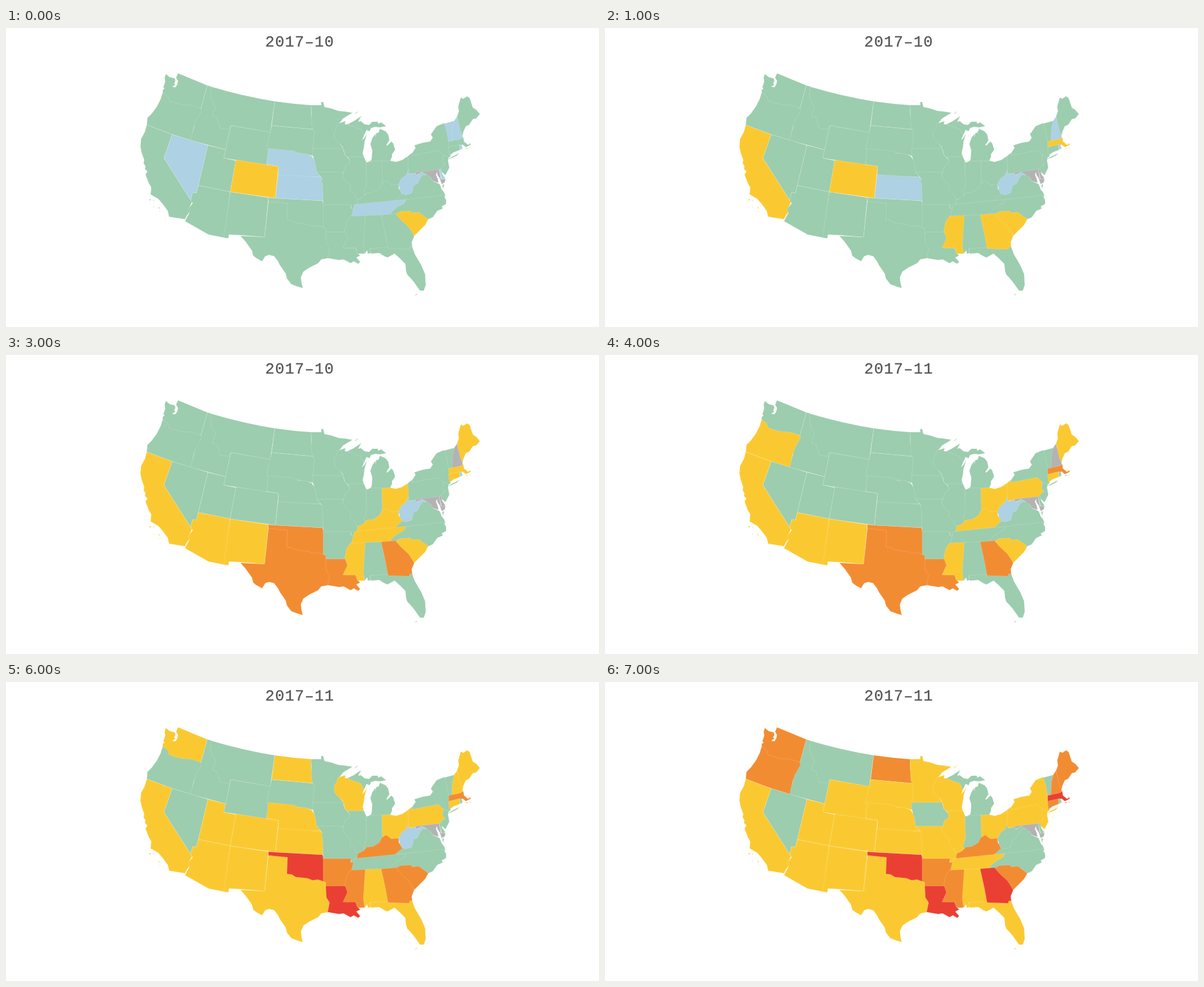
Animation of 931 by 469 pixels, one loop 8000 ms. Source, as an HTML page:

```html
<!DOCTYPE html>
<html lang="en">
<head>
<meta charset="utf-8">
<style>
  html, body { margin: 0; width: 100%; height: 100%; overflow: hidden; background: #fff; }
  svg { display: block; }
  path { stroke: #fff; stroke-opacity: .3; stroke-width: .5; stroke-linejoin: round; }
  text { font: 24px "Liberation Mono", "Courier New", monospace; letter-spacing: 1.1px; fill: #555; stroke: #555; stroke-width: .3; }
</style>
</head>
<body>
<svg width="931" height="469" viewBox="0 0 931 469">
  <text id="month" x="407" y="29"></text>
  <!-- Later states cover the overlapping edges of earlier ones. -->
  <g id="map">
    <path id="ID" d="M316 90L323 92 340 150 353 153 345 191 289 176 295 156 298 130 306 126z"/>
    <path id="OR" d="M246 101L254 105 300 122 306 126 307 130 298 146 295 155 290 176 261 167 221 152 222 141 229 134 237 123 243 111z"/>
    <path id="WA" d="M251 72L257 77 265 79 266 83 264 87 266 89 261 92 266 93 269 88 270 83 267 78 270 71 316 90 306 126 291 121 276 120 264 117 256 114 254 107 246 101 246 97 249 95 247 93 250 84 249 78z"/>
    <path id="MT" d="M322 92Q372 107 422 115L415 164 353 153 349 159 336 157 331 140 324 138 329 123 324 116 321 106z"/>
    <path id="CA" d="M221 152L261 167 248 204 290 270 292 273 287 284 288 289 284 294 281 300 256 296 254 287 246 276 239 268 227 261 228 250 224 243 219 230 222 225 218 221 219 217 216 212 217 207 213 196 211 186 212 174 218 163zM225 268l3 1-2 2zM230 269l3 1-1 1zM239 280l3 3-2 0zM241 286l1 3-1-1zM231 280l1 1-1 1z"/>
    <path id="NV" d="M261 167L317 184 302 247 299 259 293 258 290 270 248 204z"/>
    <path id="UT" d="M317 184L345 191 342 204 361 208 352 257 302 247z"/>
    <path id="AZ" d="M302 247L352 257 343 329 318 324 281 303 284 297 288 290 286 284 293 275 290 270 293 258 299 259z"/>
    <path id="NM" d="M352 257L412 266 406 328 370 325 350 324 349 330 342 329z"/>
    <path id="WY" d="M353 153L417 164 409 215 342 204z"/>
    <path id="CO" d="M361 207L428 217 423 267 352 257z"/>
    <path id="ND" d="M422 115Q450 119 479 121L479 133 483 159 417 153z"/>
    <path id="SD" d="M417 153L482 159 485 164 484 189 484 201 470 198 409 190z"/>
    <path id="NE" d="M412 189L452 193 460 197 470 197 480 201 487 211 489 226 494 234 427 232 428 217 409 214z"/>
    <path id="KS" d="M427 230L494 234 498 237 497 240 499 244 498 271 423 267z"/>
    <path id="TX" d="M412 271L442 274 445 300 500 310 505 320 505 338 509 346 506 361 495 363 490 369 476 376 467 382 463 391 464 400 466 408 459 406 448 402 441 393 439 385 430 372 427 366 421 358 413 356 407 358 402 366 393 361 388 357 386 349 376 335 368 326 406 328z"/>
    <path id="OK" d="M412 266L423 267 497 271 499 278 499 313 490 310 481 311 474 308 465 307 455 306 449 302 441 301 442 275 412 272z"/>
    <path id="MN" d="M479 121L495 121 495 116 498 116 500 124 510 126 522 130 532 131 544 133 529 142 523 150 524 182 532 191 482 189 484 164 480 154zM547 135l6-5-3 4z"/>
    <path id="WI" d="M521 150L533 146 532 151 536 151 550 153 562 162 562 169 559 176 563 172 567 165 563 178 562 187 560 196 562 203 536 203 532 199 529 187 523 181 516 174 515 163 519 157z"/>
    <path id="MI" d="M536 151L546 146 549 144 558 138 555 143 553 147 557 146 563 151 570 152 575 147 584 147 584 150 589 148 597 154 587 156 580 155 573 157 571 162 566 160 562 169 560 165 557 159 548 156zM571 210L574 206 575 192 572 182 575 173 580 166 580 171 581 165 585 164 587 158 596 162 600 167 602 176 597 184 599 184 605 178 608 181 611 191 606 198 606 202 603 209 590 210z"/>
    <path id="IA" d="M481 189L529 189 532 199 539 206 541 212 535 217 534 223 528 228 488 228 486 214 482 201z"/>
    <path id="MO" d="M488 226L527 226 540 232 550 245 554 268 550 280 546 284 541 283 542 279 498 279 497 244 495 240 497 237z"/>
    <path id="AR" d="M498 277L542 277 541 283 547 283 544 294 538 303 536 321 502 321 502 314 498 313z"/>
    <path id="LA" d="M502 320L533 320 538 330 531 345 549 345 552 353 556 357 550 360 556 367 553 370 546 366 541 369 530 363 523 364 505 361 508 346 503 338z"/>
    <path id="IL" d="M536 202L562 202 565 209 568 246 565 258 562 266 551 269 548 262 540 254 541 247 536 243 528 232 530 226 533 217 540 212 539 206z"/>
    <path id="IN" d="M565 209L567 211 571 209 592 208 594 244 588 255 579 261 564 261 562 258 566 245z"/>
    <path id="OH" d="M590 209L603 208 612 210 622 207 631 201 634 222 630 231 622 238 619 248 606 249 597 243 591 245z"/>
    <path id="VA" d="M606 272L618 258 618 248 630 240 640 236 655 228 661 228 668 236 670 240 681 245 684 253 688 258 690 264 628 271zM685 246l3-1-2 8z"/>
    <path id="KY" d="M551 276L552 269 561 265 566 259 576 258 586 252 590 244 597 240 605 246 616 245 617 252 622 261 608 273 551 279z"/>
    <path id="WV" d="M616 246L621 236 628 231 632 222 633 229 644 227 645 231 652 226 661 226 659 231 655 230 650 236 646 244 640 247 637 259 627 262 621 259z"/>
    <path id="NC" d="M602 294L608 281 628 269 687 262 691 270 691 276 684 280 686 283 677 287 670 297 663 300 648 292 638 293 635 290 619 291 612 294z"/>
    <path id="TN" d="M547 277L606 271 628 269 625 275 614 281 608 286 602 293 542 297z"/>
    <path id="MS" d="M541 295L566 294 564 340 563 354 552 354 549 345 529 345 536 330 532 318 535 303z"/>
    <path id="AL" d="M564 294L592 293 599 322 602 346 571 346 573 353 568 354 567 349 563 354 561 340z"/>
    <path id="GA" d="M589 293L613 291 622 301 634 312 641 326 637 336 638 345 633 348 600 347 596 325z"/>
    <path id="SC" d="M612 292L619 288 635 287 638 290 648 289 663 300 658 309 648 319 641 326 632 312 620 301z"/>
    <path id="FL" d="M571 346L598 344 600 346 633 347 634 343 638 344 642 355 652 372 658 386 659 403 656 412 650 412 640 398 634 391 630 387 628 381 627 370 618 361 610 354 599 360 594 358 586 353 573 354zM641 420l4-3 1 1z"/>
    <path id="NY" d="M637 201L637 197 643 188 641 184 654 180 666 178 670 172 667 167 676 154 688 149 694 162 697 178 698 201 694 204 683 198zM693 206l9-5 10-5-4 4-8 4z"/>
    <path id="PA" d="M631 201L637 196 637 200 679 192 687 200 687 209 689 214 681 223 632 229z"/>
    <path id="NJ" d="M687 199L695 203 694 208 696 219 690 231 682 224 681 221 689 214 685 209z"/>
    <path id="MD" d="M643 226L680 222 683 237 690 237 689 242 684 245 681 236 677 230 677 226 675 230 678 237 679 243 670 240 667 235 661 230 653 226 644 231z"/>
    <path id="DE" d="M680 222L683 221 685 229 690 236 684 238z"/>
    <path id="VT" d="M688 150L706 145 702 177 695 179 692 162z"/>
    <path id="NH" d="M704 145L708 139 716 163 717 171 715 175 700 178 701 157z"/>
    <path id="ME" d="M708 139L711 131 710 123 714 109 718 111 724 107 728 110 733 125 738 128 744 135 738 142 733 143 727 152 722 154 718 163 717 169 714 163z"/>
    <path id="MA" d="M695 178L714 174 718 171 719 178 725 183 728 182 727 179 730 183 722 187 717 183 695 188zM722 189l3-1-1 2zM728 188l2 0-2 1z"/>
    <path id="CT" d="M695 187L712 183 713 191 703 195 696 200z"/>
    <path id="RI" d="M712 183L715 183 717 189 713 191z"/>
  </g>
</svg>
<script>
const colors = {
  grey: '#b3b3b3', blue: '#aed1e3', green: '#9ccdae',
  yellow: '#fac932', orange: '#f28c33', red: '#ea4033'
};

// States not listed in a week are green.
const weeks = [
  { grey: 'MD', blue: 'NV NE KS TN WV VT NH RI DE', yellow: 'CO SC' },
  { grey: 'MD DE', blue: 'KS WV NH RI', yellow: 'CA CO SC GA MS MA' },
  { grey: 'MD DE', blue: 'KS IL WV NH RI', yellow: 'AZ NM CO TX OK LA GA SC KY ME MA' },
  { grey: 'MD DE NH', blue: 'WV RI', yellow: 'CA AZ NM MS TN KY OH SC ME MA CT', orange: 'TX OK LA GA' },
  { grey: 'MD NH', blue: 'WV', yellow: 'CA OR AZ NM MS KY OH SC ME CT PA', orange: 'TX OK LA GA MA' },
  { grey: 'MD', blue: 'WV AL', yellow: 'OR CO AZ NM TX WI OH KY PA ME CT', orange: 'WA CA OK AR LA MS GA SC MA' },
  { grey: 'MD', blue: 'WV', yellow: 'WA CA UT CO AZ NM TX ND NE KS WI OH PA ME NH CT AL FL',
    orange: 'AR MS KY GA SC MA', red: 'OK LA' },
  { grey: 'MD', yellow: 'CA UT CO AZ NM WY SD NE KS TX MN WI MO IL OH PA NY NJ TN AL FL',
    orange: 'WA OR ND AR MS KY SC ME NH CT', red: 'OK LA GA MA' }
];

const month = document.getElementById('month');
const states = document.querySelectorAll('#map path');
let shown = -1;

function show(index) {
  month.textContent = index < 4 ? '2017–10' : '2017–11';
  const levels = Object.entries(weeks[index]);
  for (const state of states) {
    const level = levels.find(([, ids]) => ids.includes(state.id));
    state.style.fill = colors[level ? level[0] : 'green'];
  }
  shown = index;
}

const start = performance.now();
function tick() {
  const index = Math.floor((performance.now() - start) / 1000) % weeks.length;
  if (index !== shown) show(index);
  requestAnimationFrame(tick);
}
tick();
</script>
</body>
</html>
```
